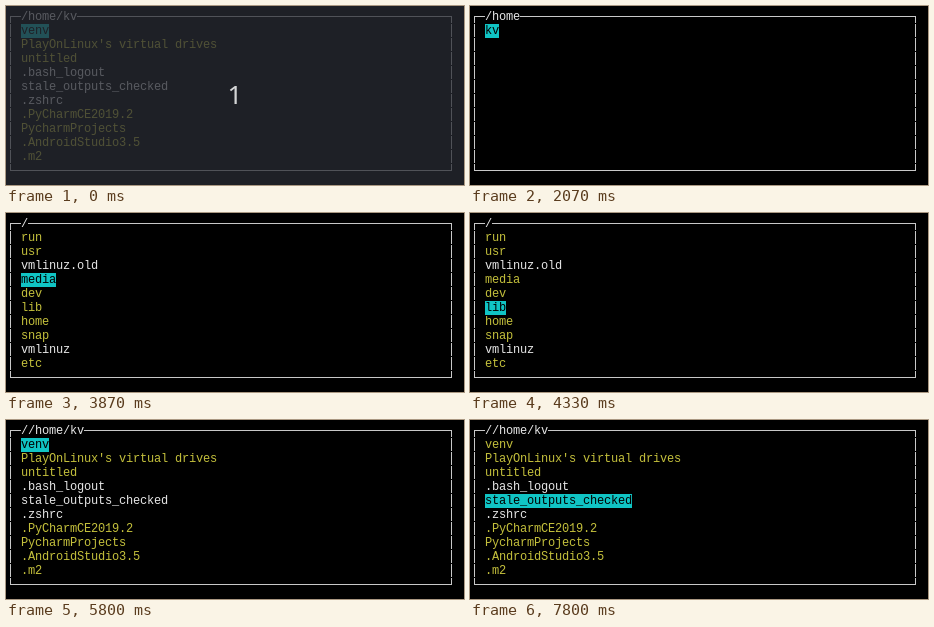
Write an HTML page with a canvas that moves like this. It is 458 px wide and 179 px high and loops after 8000 ms.

```html
<!DOCTYPE html>
<html lang="en">
<head>
<meta charset="utf-8">
<title>Directory browser</title>
<style>
  html, body { margin: 0; width: 100%; height: 100%; overflow: hidden; background: #000; }
  canvas { display: block; }
</style>
</head>
<body>
<canvas id="stage" width="458" height="179"></canvas>
<script>
const ctx = document.getElementById('stage').getContext('2d');
const LOOP = 8000;
const CELL_W = 7, ROW_H = 14, LEFT = 1, TOP = 4;
const LAST_COL = 63, LAST_ROW = 11;
const color = {
  back: '#000', line: '#c8c8c8', title: '#e6e6e6',
  file: '#e6e6e6', dir: '#c4c03c', mark: '#10c4c4', marked: '#000'
};

// A trailing slash marks a directory.
const user = ['venv/', "PlayOnLinux's virtual drives/", 'untitled/', '.bash_logout',
  'stale_outputs_checked', '.zshrc', '.PyCharmCE2019.2/', 'PycharmProjects/',
  '.AndroidStudio3.5/', '.m2/'];
const home = ['kv/'];
const root = ['run/', 'usr/', 'vmlinuz.old', 'media/', 'dev/', 'lib/', 'home/',
  'snap/', 'vmlinuz', 'etc/'];

// start time, path, entries, selected row
const steps = [
  [0, '/home/kv', user, 0],
  [2070, '/home', home, 0],
  [2600, '/', root, 0],
  [3270, '/', root, 1],
  [3530, '/', root, 2],
  [3870, '/', root, 3],
  [4070, '/', root, 4],
  [4330, '/', root, 5],
  [5000, '/', root, 6],
  [5270, '//home', home, 0],
  [5800, '//home/kv', user, 0],
  [6400, '//home/kv', user, 1],
  [6530, '//home/kv', user, 2],
  [7330, '//home/kv', user, 3],
  [7800, '//home/kv', user, 4]
];
const COUNTDOWN_END = 70;

const cellX = col => LEFT + col * CELL_W;
const rowY = row => TOP + row * ROW_H;

function rect(x, y, w, h, fill) {
  ctx.fillStyle = fill;
  ctx.fillRect(x, y, w, h);
}

function print(text, col, row, fill) {
  ctx.font = '12px "Liberation Mono", monospace';
  ctx.textAlign = 'left';
  ctx.textBaseline = 'alphabetic';
  ctx.fillStyle = fill;
  [...text].forEach((ch, i) => ctx.fillText(ch, cellX(col + i), rowY(row) + 10));
}

function drawFrame(title) {
  const x0 = cellX(0) + 3, x1 = cellX(LAST_COL) + 3;
  const y0 = rowY(0) + 6, y1 = rowY(LAST_ROW) + 6;
  rect(x0, y0, x1 - x0 + 1, 1, color.line);
  rect(x0, y1, x1 - x0 + 1, 1, color.line);
  for (const x of [x0, x1]) {
    rect(x, y0, 1, rowY(1) - y0 - 1, color.line);
    for (let row = 1; row < LAST_ROW; row++) rect(x, rowY(row), 1, ROW_H - 1, color.line);
    rect(x, rowY(LAST_ROW), 1, y1 - rowY(LAST_ROW), color.line);
  }
  rect(cellX(2), rowY(0), title.length * CELL_W, ROW_H, color.back);
  print(title, 2, 0, color.title);
}

function drawEntry(entry, index, selected) {
  const name = entry.replace('/', '');
  const row = index + 1;
  if (selected) rect(cellX(2), rowY(row), name.length * CELL_W, ROW_H, color.mark);
  print(name, 2, row, selected ? color.marked : name === entry ? color.file : color.dir);
}

function drawCountdown() {
  rect(0, 0, 458, 179, 'rgba(40, 43, 51, 0.75)');
  ctx.font = '26px "Noto Sans", sans-serif';
  ctx.textAlign = 'center';
  ctx.fillStyle = '#d4d5d6';
  ctx.fillText('1', 229, 98);
}

function draw(time) {
  const [, path, entries, selected] = steps.findLast(([start]) => start <= time);
  rect(0, 0, 458, 179, color.back);
  drawFrame(path);
  entries.forEach((entry, i) => drawEntry(entry, i, i === selected));
  if (time < COUNTDOWN_END) drawCountdown();
}

function tick() {
  draw(performance.now() % LOOP);
  requestAnimationFrame(tick);
}
tick();
</script>
</body>
</html>
```
